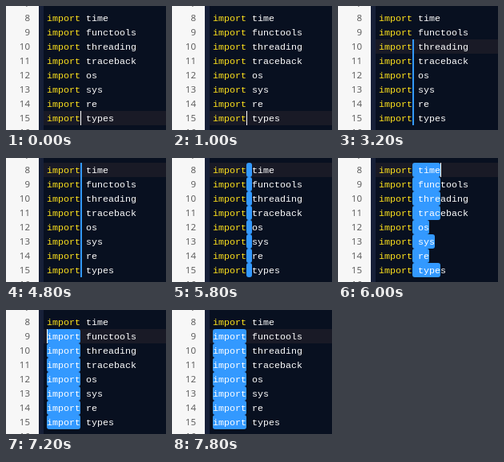
These frames come from a looping animation (200 px wide and 156 px high, 8 s). An HTML page with a canvas:

```html
<!DOCTYPE html>
<html lang="en">
<head>
<meta charset="utf-8">
<title>Column selection</title>
<style>
html, body { margin: 0; width: 100%; height: 100%; overflow: hidden; background: #081020; }
canvas { display: block; width: 200px; height: 156px; }
</style>
</head>
<body>
<canvas id="stage"></canvas>
<script>
const W = 200, H = 156, LOOP = 8000;
const TICK = 200, STEP = 240, BLINK = 500;
const ROW = 18, TOP = 6, BASE = 13, FIRST = 8, LAST = 15;
const GUTTER = 41, CODE = 47, LEFT = 51, CHAR = 7;
const KEYWORD = 'import', ANCHOR = KEYWORD.length;
const BLUE = '#3399ff';
const modules = 'time functools threading traceback os sys re types'.split(' ');

// Poses of the cursor, in order of time
const poses = [
  { at: -100, line: LAST, col: ANCHOR },
  { at: 2200, line: LAST - 1, col: ANCHOR, selecting: true, climbing: true },
  { at: 3800, line: FIRST, col: ANCHOR, selecting: true },
  { at: 5200, line: FIRST, col: ANCHOR + 1, selecting: true },
  { at: 5900, line: FIRST, col: ANCHOR + 5, selecting: true },
  { at: 7200, line: FIRST + 1, col: 0, selecting: true }
];

const canvas = document.getElementById('stage');
const ctx = canvas.getContext('2d');
const dpr = window.devicePixelRatio || 1;
canvas.width = W * dpr;
canvas.height = H * dpr;
ctx.scale(dpr, dpr);

const rowY = line => TOP + (line - FIRST) * ROW;
const colX = col => LEFT + col * CHAR;

function rect(x, y, w, h, color) {
  ctx.fillStyle = color;
  ctx.fillRect(x, y, w, h);
}

function text(str, x, line, color) {
  ctx.fillStyle = color;
  ctx.fillText(str, x, rowY(line) + BASE);
}

function cursorAt(t) {
  const pose = poses.findLast(p => p.at <= t);
  const age = t - pose.at;
  const line = pose.line - (pose.climbing ? Math.floor(age / STEP) : 0);
  // An empty column selection covers the caret for its first half blink
  const covered = pose.selecting && pose.col === ANCHOR;
  const lit = Math.floor(age / BLINK) % 2 === (covered ? 1 : 0);
  return { ...pose, line, lit };
}

function drawSelection({ line, col }) {
  const from = Math.min(col, ANCHOR), to = Math.max(col, ANCHOR);
  for (let n = line; n <= LAST; n++) {
    const lineEnd = ANCHOR + 1 + modules[n - FIRST].length;
    const w = (Math.min(to, lineEnd) - from) * CHAR;
    if (!w) {
      rect(colX(from), rowY(n), 2, ROW, BLUE);
      continue;
    }
    ctx.fillStyle = BLUE;
    ctx.beginPath();
    ctx.roundRect(colX(from), rowY(n), w, ROW, 3);
    ctx.fill();
  }
}

function drawCode({ line, col }) {
  ctx.font = '11.667px "Liberation Mono", "Courier New", monospace';
  ctx.textAlign = 'left';
  modules.forEach((name, i) => {
    const n = FIRST + i;
    const selected = col < ANCHOR && n >= line;
    text(KEYWORD, LEFT, n, selected ? '#fff' : '#ffe31c');
    text(name, colX(ANCHOR + 1), n, '#fff');
  });
}

function drawGutter() {
  rect(0, 0, GUTTER, H, '#f7f7f7');
  rect(GUTTER, 0, CODE - GUTTER, H, '#172038');
  ctx.font = '11.5px "Open Sans", sans-serif';
  ctx.textAlign = 'right';
  for (let n = FIRST - 1; n <= LAST + 1; n++) text(n, 30, n, '#555');
}

function draw(t) {
  const cursor = cursorAt(t);
  rect(0, 0, W, H, '#081020');
  rect(CODE, rowY(cursor.line), W - CODE, ROW, '#191a26');
  if (cursor.selecting) drawSelection(cursor);
  drawCode(cursor);
  if (cursor.lit) rect(colX(cursor.col), rowY(cursor.line), 1, ROW, '#fff');
  drawGutter();
}

const origin = performance.now();
function frame() {
  const t = (performance.now() - origin) % LOOP;
  draw(Math.floor(t / TICK) * TICK);
  requestAnimationFrame(frame);
}
frame();
</script>
</body>
</html>
```
